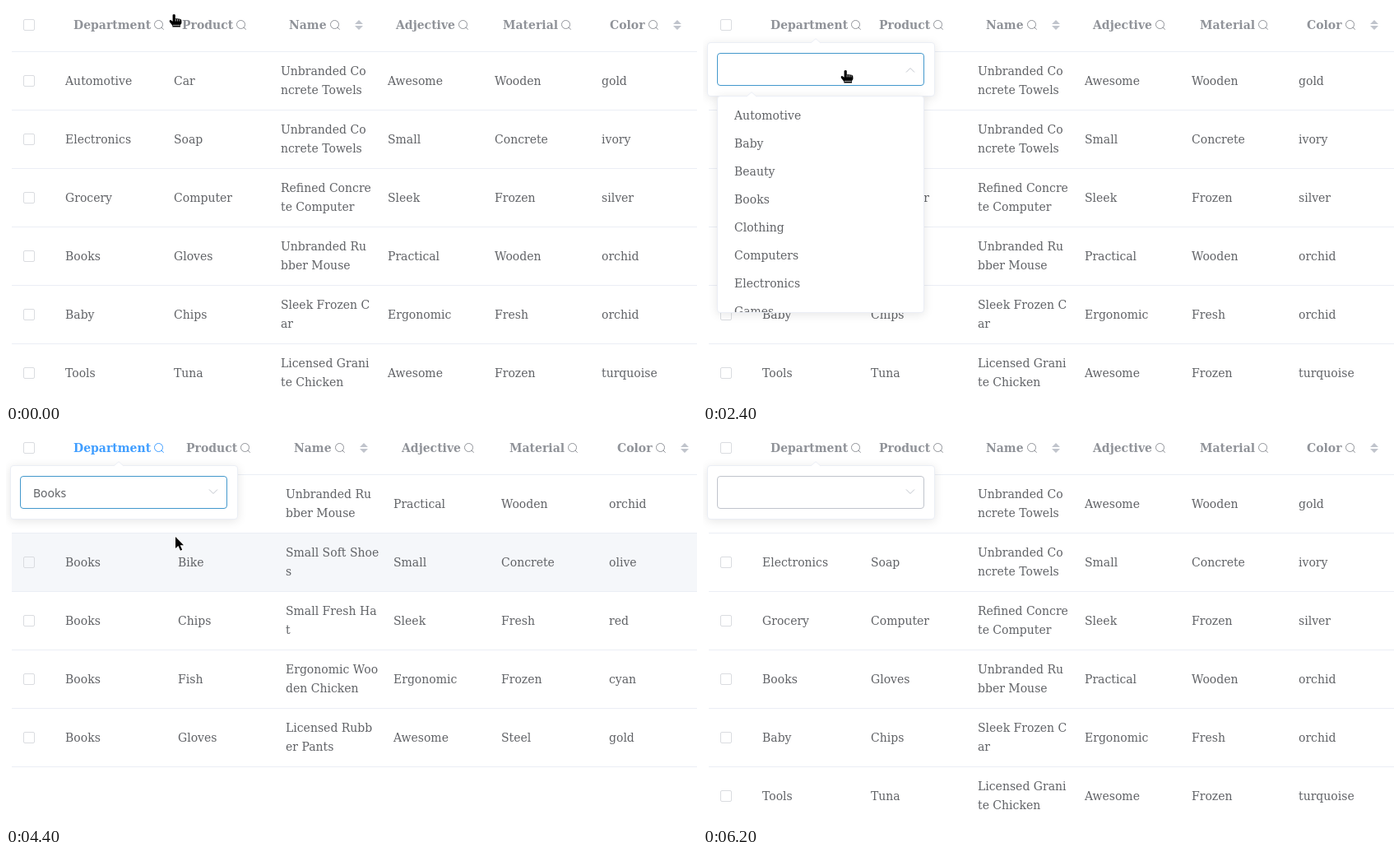
An HTML page that plays this animation: 840x480 px, repeating every 6700 ms.

```html
<!DOCTYPE html>
<html lang="en">
<head>
<meta charset="utf-8">
<title>Table filter</title>
<style>
  html, body { margin: 0; width: 100%; height: 100%; overflow: hidden; background: #fff; }
  body { position: relative; font: 14px/23px "DejaVu Serif", serif; color: #606266; }
  div, .layer { position: absolute; box-sizing: border-box; }
  .cell { white-space: pre; }
  .head { top: 12px; font-weight: bold; color: #909399; }
  .head.on { color: #409eff; }
  .head svg { vertical-align: -1px; margin-left: 4px; fill: none; stroke: currentColor; }
  .head .sort { margin-left: 17px; fill: #c0c4cc; stroke: none; }
  .box { left: 21px; width: 14px; height: 14px; border: 1px solid #dadce0; border-radius: 2px; }
  .line { left: 7px; width: 833px; height: 1px; background: #ebeef5; }
  .panel { background: #fff; border: 1px solid #ebeef5; border-radius: 4px; box-shadow: 0 2px 12px rgba(0, 0, 0, .1); }
  .tip { fill: #fff; stroke: #ebeef5; top: -6px; }
  .thin { fill: none; stroke: #c0c4cc; }
  #rowHover { left: 7px; width: 833px; height: 70px; background: #f5f7fa; }
  #popover { left: 5px; top: 44px; width: 277px; height: 66px; }
  #input { left: 11px; top: 12px; width: 252px; height: 40px; border: 1px solid; border-radius: 4px; }
  #value { left: 15px; top: 0; font: 14px/40px "Noto Sans", sans-serif; }
  #marks { left: 234px; top: 20px; overflow: visible; }
  #drop { left: 17px; top: 109px; width: 252px; height: 264px; transform-origin: 0 0; }
  #list { inset: 0; overflow: hidden; }
  #list .item { left: 20px; line-height: 34px; }
  #itemHover { left: 0; width: 250px; height: 34px; background: #f1f4f8; }
  #bar { left: 242px; top: 2px; width: 6px; height: 89px; border-radius: 3px; background: rgba(144, 147, 153, .33); }
  #cursor { left: 0; top: 0; overflow: visible; }
  #cursor path { fill: #000; stroke: #fff; stroke-width: 1.6; paint-order: stroke; stroke-linejoin: round; }
  #cursor .gap { fill: none; stroke-width: .7; }
</style>
</head>
<body>
<div id="rowHover"></div>
<div id="full"></div>
<div id="filtered"></div>

<div id="popover" class="panel">
  <svg class="layer tip" style="left:125px" width="12" height="7"><path d="M0 6L6 .7 12 6"/></svg>
  <div id="input">
    <div id="value">Books</div>
  </div>
  <svg id="marks" class="layer" width="24" height="24">
    <path id="chevron" class="thin" d="M-5-3.5L0 1.5 5-3.5"/>
    <path id="clear" class="thin" d="M6 12a6 6 0 1 0 12 0a6 6 0 1 0-12 0M9.8 9.8l4.4 4.4m0-4.4l-4.4 4.4"/>
  </svg>
</div>

<div id="drop" class="panel">
  <svg class="layer tip" style="left:35px" width="12" height="7"><path d="M0 6L6 .7 12 6"/></svg>
  <div id="list">
    <div id="itemHover"></div>
    <div id="bar"></div>
  </div>
</div>

<svg id="cursor" class="layer" width="1" height="1">
  <g id="hand">
    <path d="M-2.4.8Q-.8-.8.8.8V5L6.6 5.8Q8.4 6.4 8.4 8V11L7 13V15.6H-2.6V13.8L-6.2 9.2Q-6.8 6.8-4.8 7L-2.4 8.8Z"/>
    <path class="gap" d="M1.2 5.5V8.5M3.6 6V8.5M6 6.3V8.5M-2 13.4H6.5"/>
  </g>
  <path id="arrow" d="M0 0V14L3.4 11 6 16.8 8.2 15.8 5.7 10.2H10Z"/>
</svg>

<script>
const $ = id => document.getElementById(id);
const LOOP = 6700, STEP = 100;
const ROW_TOP = 56, ROW_H = 71, LIST_TOP = 116, ITEM_H = 34;
const OPEN = 2000, PICK = 3500, RESET = 5700, BLUR = 6100;

const titles = ['Department', 'Product', 'Name', 'Adjective', 'Material', 'Color'];
const sortable = ['Name', 'Color'];
const allRows = [
  'Automotive,Car,Unbranded Co|ncrete Towels,Awesome,Wooden,gold',
  'Electronics,Soap,Unbranded Co|ncrete Towels,Small,Concrete,ivory',
  'Grocery,Computer,Refined Concre|te Computer,Sleek,Frozen,silver',
  'Books,Gloves,Unbranded Ru|bber Mouse,Practical,Wooden,orchid',
  'Baby,Chips,Sleek Frozen C|ar,Ergonomic,Fresh,orchid',
  'Tools,Tuna,Licensed Grani|te Chicken,Awesome,Frozen,turquoise'
];
const bookRows = [
  allRows[3],
  'Books,Bike,Small Soft Shoe|s,Small,Concrete,olive',
  'Books,Chips,Small Fresh Ha|t,Sleek,Fresh,red',
  'Books,Fish,Ergonomic Woo|den Chicken,Ergonomic,Frozen,cyan',
  'Books,Gloves,Licensed Rubb|er Pants,Awesome,Steel,gold'
];
const items = ['Automotive', 'Baby', 'Beauty', 'Books', 'Clothing', 'Computers', 'Electronics', 'Games'];

const lens = '<svg width="13" height="13"><path d="M.5 6.5a5 5 0 1 0 10 0a5 5 0 1 0-10 0M9.1 10.1l2.6 2.6"/></svg>';
const arrows = '<svg class="sort" width="10" height="13"><path d="M0 6l5-5 5 5zM0 8l5 5 5-5z"/></svg>';
const checkbox = mid => `<div class="box" style="top:${mid - 7}px"></div>`;
const rule = y => `<div class="line" style="top:${y}px"></div>`;

// The first column is fixed; the others share the rest evenly.
const columnX = (i, filtered) => i === 0 ? 72 : filtered ? 78 + 131 * i : 74 + 130 * i;

function table(rows, filtered) {
  let out = checkbox(23) + rule(55);
  titles.forEach((title, i) => {
    const on = filtered && i === 0 ? 'on' : '';
    const x = columnX(i, filtered) + 10;
    out += `<div class="cell head ${on}" style="left:${x}px">${title}${lens}${sortable.includes(title) ? arrows : ''}</div>`;
  });
  rows.forEach((row, r) => {
    const top = ROW_TOP + r * ROW_H;
    out += checkbox(top + 35) + rule(top + 70);
    row.split(',').forEach((text, i) => {
      const y = top + (text.includes('|') ? 12 : 24);
      out += `<div class="cell" style="left:${columnX(i, filtered)}px;top:${y}px">${text.replace('|', '\n')}</div>`;
    });
  });
  return out;
}

$('full').innerHTML = table(allRows, false);
$('filtered').innerHTML = table(bookRows, true);
$('bar').insertAdjacentHTML('beforebegin', items.map((s, i) =>
  `<div class="item" style="top:${6 + i * ITEM_H}px">${s}</div>`).join(''));

const smooth = k => k * k * (3 - 2 * k);
const easeOut = power => k => 1 - (1 - k) ** power;
const linear = k => k;
const ramp = (t, from, to, ease = linear) => ease(Math.min(1, Math.max(0, (t - from) / (to - from))));

const home = { x: 205, y: 10 };
const moves = [
  { from: 100, to: 600, x: 185, y: 26, ease: smooth },
  { from: 1500, to: 2000, x: 174, y: 78, ease: smooth },
  { from: 2500, to: 3100, x: 123, y: 230, ease: easeOut(2) },
  { from: 4000, to: 5000, x: 252, y: 76, ease: easeOut(2) },
  { from: RESET, to: 6200, x: 262, y: -24, ease: smooth }
];

function pointer(t) {
  let { x, y } = home;
  for (const m of moves) {
    const k = ramp(t, m.from, m.to, m.ease);
    x += (m.x - x) * k;
    y += (m.y - y) * k;
  }
  return [Math.round(x), Math.round(y)];
}

const show = (id, on) => $(id).style.display = on ? '' : 'none';
const snap = (v, origin, size) => Math.floor((v - origin) / size) * size;

function borderColor(t, overInput) {
  if (t >= OPEN && t < BLUR) return '#4398cc';
  return overInput || t >= BLUR ? '#c0c4cc' : '#dcdfe6';
}

function draw(t) {
  const [x, y] = pointer(t);
  const filtered = t > PICK && t < RESET;
  const overInput = x > 17 && x < 269 && y > 57 && y < 97;
  const inRows = t > 4000 && t < RESET && y > 110;
  const inList = t > OPEN && t <= PICK && y > LIST_TOP;

  show('full', !filtered);
  show('filtered', filtered);
  show('rowHover', inRows);
  $('rowHover').style.top = ROW_TOP + snap(y, ROW_TOP, ROW_H) + 'px';

  $('popover').style.opacity = ramp(t, 900, 1100);
  $('input').style.borderColor = borderColor(t, overInput);
  show('value', filtered);
  const clearing = filtered && t > 4000 && overInput;
  show('clear', clearing);
  show('chevron', !clearing);
  const angle = -180 * (ramp(t, OPEN - 50, OPEN + 250, smooth) - ramp(t, PICK, PICK + 250, smooth));
  $('chevron').setAttribute('transform', `translate(12 12) rotate(${angle})`);

  const left = 1 - ramp(t, PICK, PICK + 200);
  const opened = ramp(t, OPEN, OPEN + 400, easeOut(5));
  show('drop', opened * left > 0);
  $('drop').style.transform = `scaleY(${opened * left ** 3})`;
  $('drop').style.opacity = opened * left ** 2;
  show('itemHover', inList);
  $('itemHover').style.top = 6 + snap(y, LIST_TOP, ITEM_H) + 'px';
  show('bar', inList);

  const arrow = t > PICK && !overInput;
  show('arrow', arrow);
  show('hand', !arrow);
  $('cursor').style.transform = `translate(${x}px, ${y}px)`;
}

const start = performance.now();
function tick() {
  const t = (performance.now() - start) % LOOP;
  draw(Math.floor(t / STEP) * STEP);
  requestAnimationFrame(tick);
}
tick();
</script>
</body>
</html>
```
